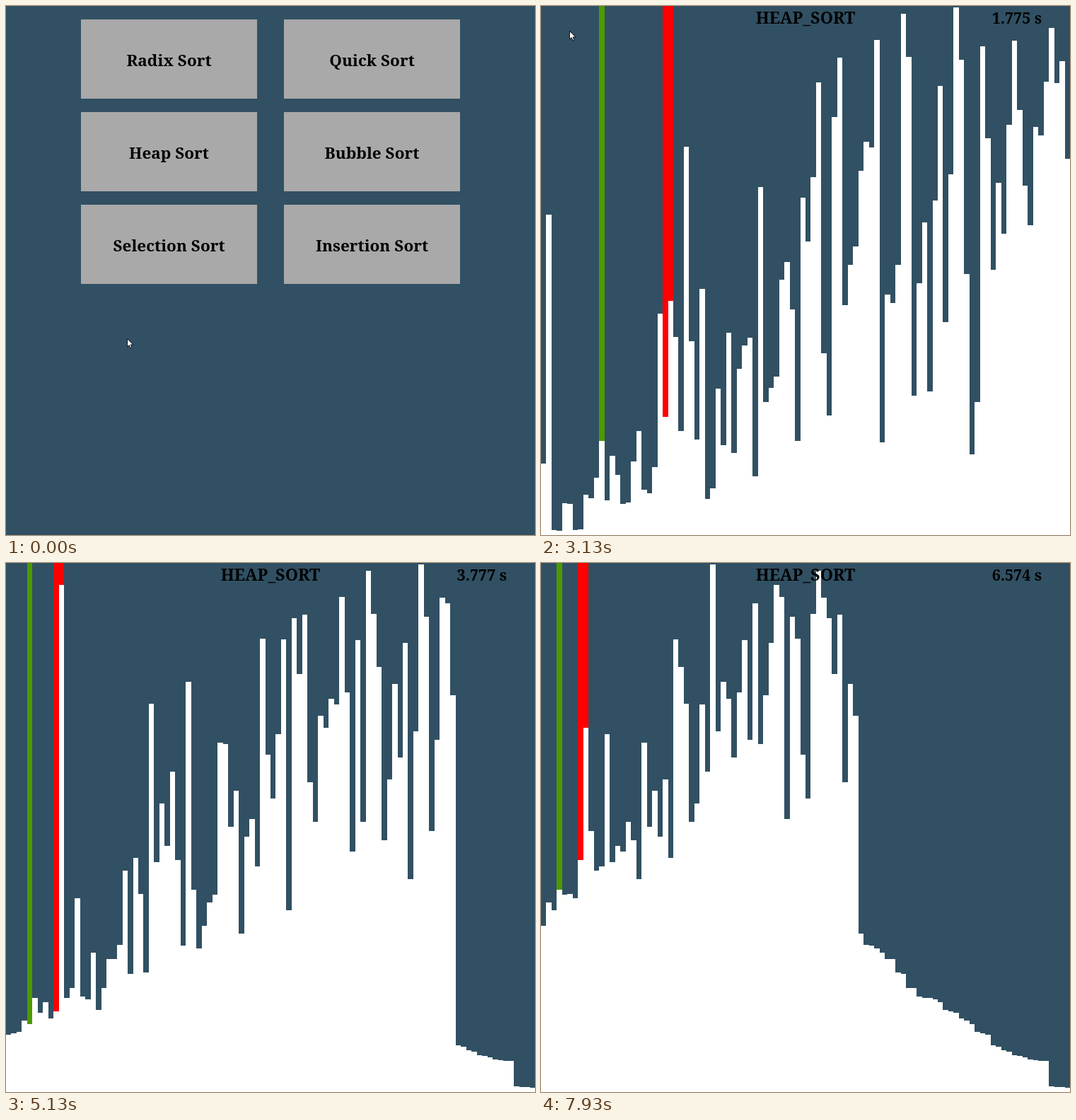
Animation of 748 by 748 pixels, one loop 8000 ms. Source, as an HTML page with a canvas:

```html
<!DOCTYPE html>
<html lang="en">
<head>
<meta charset="utf-8">
<title>Heap sort</title>
<style>
  html, body { margin: 0; width: 100%; height: 100%; overflow: hidden; background: #315063; }
  canvas { display: block; width: 748px; height: 748px; }
</style>
</head>
<body>
<canvas id="stage" width="748" height="748"></canvas>
<script>
const SIZE = 748, LOOP = 8000, FPS = 15, SORT_START = 1730;
const BLUE = '#315063', RED = '#ff0000', GREEN = '#4c9900';
const FONT = '"Noto Serif", serif';
const ctx = document.getElementById('stage').getContext('2d');

const values = [
  647, 295, 581, 682, 322, 31, 199, 740, 392, 373, 310, 704, 601, 636, 233, 742, 366, 275, 447, 684,
  696, 168, 387, 107, 216, 108, 579, 73, 474, 613, 192, 697, 408, 541, 621, 462, 691, 113, 238, 76,
  560, 57, 689, 652, 524, 254, 362, 741, 615, 417, 333, 242, 468, 491, 699, 157, 741, 423, 366, 340,
  663, 400, 200, 48, 617, 704, 420, 702, 11, 72, 551, 644, 306, 545, 632, 601, 513, 480, 2, 469,
  379, 634, 665, 256, 187, 560, 250, 540, 667, 49, 147, 703, 435, 171, 183, 615, 429, 109, 78, 271
];

// Records every visible step of the sort.
function heapSort(a) {
  const steps = [];
  const swap = (i, j) => { [a[i], a[j]] = [a[j], a[i]]; };
  const record = (n, node, marked) => steps.push({ n, node, marked, bars: a.slice() });

  function siftDown(i, n) {
    while (2 * i + 1 < n) {
      const kids = [2 * i + 1, 2 * i + 2].filter(k => k < n);
      let top = i;
      for (const k of kids) if (a[k] > a[top]) top = k;
      if (top !== i) swap(i, top);
      record(n, i, kids);
      if (top === i) return;
      i = top;
    }
  }

  for (let i = a.length / 2 - 1; i >= 0; i--) siftDown(i, a.length);
  for (let n = a.length - 1; n > 0; n--) {
    swap(0, n);
    record(n, 0, [n]);
    siftDown(0, n);
  }
  return steps;
}

const steps = heapSort(values);
const stepAt = (n, node) => steps.findLastIndex(s => s.n === n && s.node === node);

// time in ms, step, shown seconds
const pace = [
  [1733, 2, 0.371],
  [3133, stepAt(100, 11), 1.775],
  [4000, stepAt(94, 3), 2.644],
  [5133, stepAt(85, 4), 3.777],
  [6800, stepAt(71, 19), 5.435],
  [7933, stepAt(60, 3), 6.574]
];

// time in ms, x, y
const pointer = [
  [133, 171, 470],
  [600, 169, 233],
  [2400, 169, 233],
  [3133, 40, 35],
  [3400, -15, -20]
];

const linear = p => p;
const smooth = p => p * p * (3 - 2 * p);

function sample(keys, t, ease) {
  if (t <= keys[0][0]) return keys[0].slice(1);
  for (let k = 1; k < keys.length; k++) {
    const from = keys[k - 1], to = keys[k];
    if (t <= to[0]) {
      const p = ease((t - from[0]) / (to[0] - from[0]));
      return from.slice(1).map((v, j) => v + (to[j + 1] - v) * p);
    }
  }
  return keys[keys.length - 1].slice(1);
}

function rect(color, x, y, w, h) {
  ctx.fillStyle = color;
  ctx.fillRect(x, y, w, h);
}

function label(text, x, y, size) {
  ctx.font = `bold ${size}px ${FONT}`;
  ctx.textAlign = 'center';
  ctx.fillStyle = '#000';
  ctx.fillText(text, x, y);
}

const names = ['Radix', 'Quick', 'Heap', 'Bubble', 'Selection', 'Insertion'];

function drawMenu(px, py) {
  rect(BLUE, 0, 0, SIZE, SIZE);
  names.forEach((name, k) => {
    const x = k % 2 ? 393 : 106, y = 19 + 131 * (k >> 1);
    const hover = px >= x && px < x + 249 && py >= y && py < y + 112;
    rect(hover ? '#c8c8c8' : '#a9a9a9', x, y, 249, 112);
    label(name + ' Sort', x + 124.5, y + 65.5, 22.5);
  });
}

function drawSort(t) {
  const [index, seconds] = sample(pace, t, linear);
  const { node, marked, bars } = steps[Math.round(index)];
  const edge = i => Math.round(i * SIZE / bars.length);
  rect('#fff', 0, 0, SIZE, SIZE);
  bars.forEach((depth, i) => {
    const color = i === node ? GREEN : marked.includes(i) ? RED : BLUE;
    rect(color, edge(i), 0, edge(i + 1) - edge(i), depth);
  });
  label('HEAP_SORT', 374, 24.5, 23.3);
  label(seconds.toFixed(3) + ' s', 673, 24.5, 21.5);
}

const arrow = new Path2D('M.5 .5V12L3.2 9.6L5 13.8L6.9 13L5.2 8.9H8.8Z');

function drawPointer(x, y) {
  ctx.save();
  ctx.translate(x, y);
  ctx.fillStyle = '#fff';
  ctx.fill(arrow);
  ctx.strokeStyle = '#000';
  ctx.lineWidth = 0.9;
  ctx.stroke(arrow);
  ctx.restore();
}

const start = performance.now();

function tick() {
  const t = (performance.now() - start) % LOOP;
  // Ticks fall on a 15 fps grid rounded to 10 ms.
  const gridTime = Math.floor((t + 3.4) * FPS / 1000) * 1000 / FPS;
  const [x, y] = sample(pointer, gridTime, smooth);
  if (gridTime < SORT_START) drawMenu(x, y);
  else drawSort(gridTime);
  drawPointer(x, y);
  requestAnimationFrame(tick);
}
tick();
</script>
</body>
</html>
```
